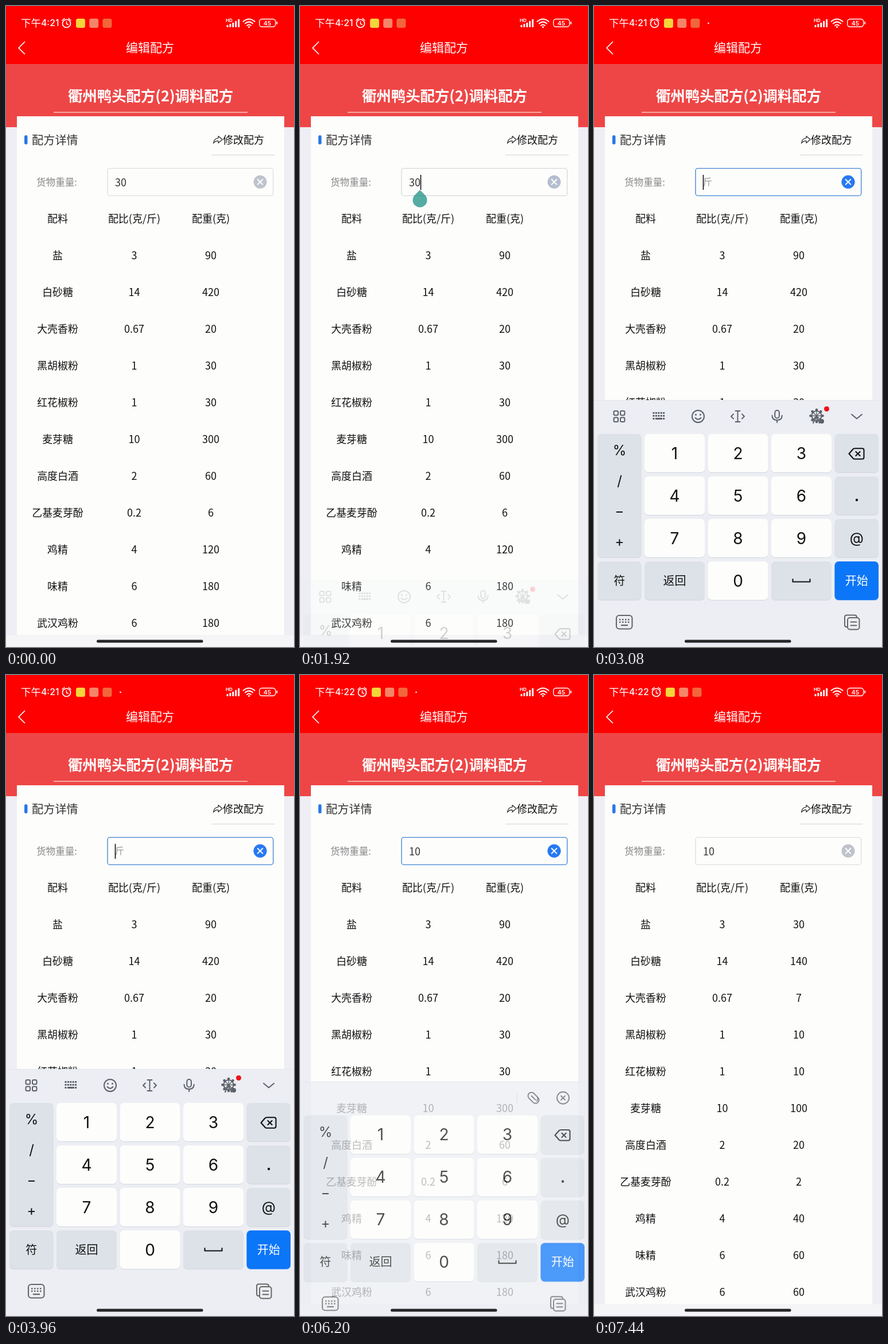
Recreate the animation shown at these times as an HTML page. Size 502 by 1116 pixels, loop 8000 ms.

```html
<!DOCTYPE html>
<html lang="zh-CN">
<head>
<meta charset="utf-8">
<style>
html, body { margin: 0; width: 100%; height: 100%; overflow: hidden; background: #eeeef4; }
svg { display: block; }
text { font-family: "Noto Sans CJK SC", "Noto Sans CJK", sans-serif; }
.mid { text-anchor: middle; }
.ui { font-family: Inter, "Noto Sans CJK SC", sans-serif; }
.line { fill: none; stroke-linecap: round; stroke-linejoin: round; }
</style>
</head>
<body>
<svg id="stage" width="502" height="1116"></svg>
<script>
const LOOP = 8000;
const FOCUS = 1885, DELETE_1 = 2720, DELETE_2 = 2960, TYPE_1 = 4400, TYPE_0 = 5240;
const MINUTE = 5600, BLUR = 6156, RECALC = 6280, DOT_OFF = 7320;
const INK = '#5c6068';

// Markup helpers; text is placed by its visual centre line.
const text = (x, y, s, size, fill = '#111', cls = 'mid', more = '') =>
  `<text x="${x}" y="${y + size * 0.37}" font-size="${size}" fill="${fill}" class="${cls}" ${more}>${s}</text>`;
const rect = (x, y, w, h, fill, r = 0, more = '') =>
  `<rect x="${x}" y="${y}" width="${w}" height="${h}" rx="${r}" fill="${fill}" ${more}/>`;
const line = (d, stroke, width = 2) =>
  `<path class="line" d="${d}" stroke="${stroke}" stroke-width="${width}"/>`;
const disc = (x, y, r, fill, more = '') => `<circle cx="${x}" cy="${y}" r="${r}" fill="${fill}" ${more}/>`;
const ring = (x, y, r, stroke, width = 2) =>
  disc(x, y, r, 'none', `stroke="${stroke}" stroke-width="${width}"`);
const cross = (x, y, r, stroke, width = 2) =>
  line(`M${x - r} ${y - r}l${2 * r} ${2 * r}m0 ${-2 * r}l${-2 * r} ${2 * r}`, stroke, width);
const group = (id, body) => `<g id="${id}">${body}</g>`;

const items = [
  ['盐', 3], ['白砂糖', 14], ['大壳香粉', 0.67], ['黑胡椒粉', 1], ['红花椒粉', 1], ['麦芽糖', 10],
  ['高度白酒', 2], ['乙基麦芽酚', 0.2], ['鸡精', 4], ['味精', 6], ['武汉鸡粉', 6]
];

function statusBar() {
  const bars = [4, 6, 8, 11, 14].map((h, i) => rect(384.5 + i * 4.9, 37 - h, 3, h, '#fff', 1)).join('');
  const alarm = ring(105.5, 30.5, 7, '#fff', 1.7) +
    line('M105.5 27v4l3 1.5M98 25l4-3.5M113 25l-4-3.5', '#fff', 1.5);
  const apps = ['#f4d53a', '#f58468', '#f2663c']
    .map((c, i) => rect(122 + i * 23.2, 22, 16, 16, c, 3.5)).join('');
  const wifi = [[10, 27], [6.7, 30.5], [3.4, 34]]
    .map(([w, y]) => line(`M${423.5 - w} ${y}q${w} ${-w * 0.85} ${2 * w} 0`, '#fff', 2)).join('');
  return text(26, 29.5, '下午', 17.5, '#fff', '') +
    text(61, 29.5, '4:21', 15.8, '#fff', 'ui', 'id="clock" font-weight="500"') +
    group('icons', alarm + apps + group('dot', disc(199.5, 30, 1.3, '#fff'))) +
    text(389, 25, 'HD', 8, '#fff', 'mid ui', 'font-weight="700"') + bars +
    wifi + disc(423.5, 36.5, 1.6, '#fff') +
    rect(441.7, 22.7, 28, 13.6, 'none', 4.5, 'stroke="#fff" stroke-width="1.4"') +
    rect(471.3, 27, 1.8, 5, '#fff', 0.9) +
    text(455.5, 29.8, '45', 10.5, '#fff', 'mid ui', 'font-weight="600"');
}

function inputFrame(stroke, fill) {
  return rect(177, 282.7, 288.7, 47.6, 'none', 4, `stroke="${stroke}" stroke-width="1.3"`) +
    disc(443, 306.3, 11.5, fill) + cross(443, 306.3, 4.3, '#fff', 2);
}

function page() {
  const rows = items.map(([name, ratio], i) => {
    const y = 434 + i * 64;
    return text(90, y, name, 17.9) + text(223.5, y, ratio, 18) +
      text(357, y, '', 18, '#111', 'mid weight');
  }).join('');
  return rect(0, 0, 502, 1116, '#eeeef4') + rect(0, 100, 502, 111, '#ee4646') +
    rect(0, 0, 502, 101, '#fe0000') + statusBar() +
    line('M32.5 62.5l-10.5 10.5 10.5 10.5', '#fff', 1.7) + text(251, 72.3, '编辑配方', 21, '#fff') +
    text(252, 156.5, '衢州鸭头配方(2)调料配方', 25.4, '#fff', 'mid', 'font-weight="700"') +
    rect(83, 184.5, 338, 1.2, '#fbe9e2') +
    rect(19, 192, 466, 903.5, '#fdfdfc') + rect(0, 1095.5, 502, 20.5, '#f5f5f8') +
    rect(32, 225, 5.5, 16, '#2878e6', 2.7) + text(45, 233.5, '配方详情', 20.2, '#333', '') +
    line('M370 226.5l7 6-7 6v-3.5q-5-.5-8.5 4 .8-8.3 8.5-9z', '#222', 1.2) +
    text(378, 233.3, '修改配方', 18, '#111', '') + rect(358, 259, 110.5, 1, '#d6d6c8') +
    text(53, 306.5, '货物重量:', 16.6, '#888', '') +
    inputFrame('#dedfdc', '#bfc3cd') + group('focused', inputFrame('#4488d8', '#2679f3')) +
    text(190, 306.5, '斤', 16, '#999', '', 'id="hint"') +
    text(190, 307.2, '', 18, '#333', '', 'id="value"') +
    rect(0, 294, 1.6, 26, '#111', 0, 'id="caret"') +
    text(90, 370, '配料', 18) + text(223.5, 370, '配比(克/斤)', 18) + text(357, 370, '配重(克)', 18) + rows +
    '<path id="handle" fill="#008577" d="M209 320.3l8.8 8.8a12.5 12.5 0 1 1-17.6 0z"/>';
}

function key(x, y, w, label = '', fill = '#fdfdfc', size = 28, h = 67) {
  const primary = fill === '#0c76f8';
  return rect(x, y + 1, w, h, primary ? '#7fb2f5' : '#d0d6df', 7) + rect(x, y, w, h, fill, 7) +
    text(x + w / 2, y + h / 2 - 0.3, label, size, primary ? '#fff' : '#111', 'mid ui');
}

function toolbar() {
  let s = '';
  for (const x of [34.5, 46]) for (const y of [705, 716.5])
    s += rect(x, y, 7.5, 7.5, 'none', 2.2, `stroke="${INK}" stroke-width="2"`);
  for (let i = 0; i < 10; i++) s += rect(102.5 + i % 5 * 4.4, 707 + (i > 4) * 5, 3, 3, INK, 0.6);
  s += rect(102.5, 717, 3, 3, INK) + rect(107, 717, 12, 3, INK) + rect(120.1, 717, 3, 3, INK);
  s += ring(181.5, 714.5, 10.5, INK) + disc(177.5, 711.5, 1.5, INK) + disc(185.5, 711.5, 1.5, INK) +
    line('M176.5 717q5 5.5 10 0', INK);
  s += line('M246.5 705h8M246.5 724h8M250.5 705v19M243 710.5l-4 4 4 4M258 710.5l4 4-4 4', INK, 1.9);
  s += rect(315.3, 704, 7.6, 13.5, 'none', 3.8, `stroke="${INK}" stroke-width="2"`) +
    line('M310.5 713q0 8 8.6 8t8.6-8M319.1 721v4', INK);
  s += ring(388, 713.5, 8.5, INK, 2);
  for (let a = 0; a < 8; a++) {
    const dx = Math.cos(a * Math.PI / 4), dy = Math.sin(a * Math.PI / 4);
    s += line(`M388 713.5l${dx * 8.5} ${dy * 8.5}`, INK, 1.3) + disc(388 + dx * 10.5, 713.5 + dy * 10.5, 2.3, INK);
  }
  s += line('M388 714l-6 12M388 714l5 12', INK, 2) + disc(397, 723, 4, INK);
  return s + disc(405.5, 701.5, 4.5, '#f01018') + line('M449 711l9 7.5 9-7.5', INK);
}

function suggestions() {
  const link = line('M405 720.5h-3a6 6 0 0 1 0-12h7a6 6 0 0 1 6 6M409 708.5h3a6 6 0 0 1 0 12h-7M402 714.5h10', INK, 1.9);
  return group('words', text(36.5, 714, '号', 25) + text(101, 714, '点', 25)) +
    rect(377.5, 706, 1, 17, '#ccd0da') + `<g transform="rotate(45 407 714.5)">${link}</g>` +
    ring(458.5, 714.5, 10.5, INK, 1.9) + cross(458.5, 714.5, 3.5, INK, 1.9);
}

function keyboard() {
  const grey = '#dde2e8';
  const cols = [88, 198.5, 309], rows = [745, 819, 893];
  let s = rect(0, 686, 502, 440, '#ecEEf3') + rect(0, 686, 502, 1, '#e0e4ea') +
    group('toolbar', toolbar()) + group('suggestions', suggestions());
  s += key(6, 745, 76.5, '', grey, 20, 215);
  ['%', '/', '−', '+'].forEach((c, i) => s += text(44.5, 773 + i * 53, c, 24, '#111', 'mid ui'));
  for (let n = 0; n < 9; n++) s += key(cols[n % 3], rows[Math.floor(n / 3)], 105, n + 1);
  ['', '', '@'].forEach((c, i) => s += key(419.5, rows[i], 76.5, c, grey, 25));
  s += disc(458, 860, 2.2, '#111') +
    line('M444.5 779.5l7-8q1.2-1.3 3-1.3h13q3 0 3 3v12.6q0 3-3 3h-13q-1.8 0-3-1.3z', '#111', 2.1) +
    cross(460, 779.5, 3.6, '#111', 2.1);
  s += key(6, 967, 76.5, '符', grey, 20) + key(88, 967, 105, '返回', grey, 20) + key(198.5, 967, 105, '0') +
    key(309, 967, 105, '', grey) + key(419.5, 967, 76.5, '开始', '#0c76f8', 20) +
    line('M346.5 998v4.5h30v-4.5', '#111', 2.1);
  s += rect(39, 1061, 27.5, 23.5, 'none', 5, 'stroke="#666" stroke-width="2.1"');
  for (let i = 0; i < 8; i++) s += rect(44 + i % 4 * 5, 1067 + (i > 3) * 4.5, 2.5, 2.5, '#666');
  s += rect(47, 1077, 12, 2.3, '#666');
  s += line('M441 1081h-.5q-3.5 0-3.5-3.5v-13.5q0-3.5 3.5-3.5h13.5q4 0 4 4', '#666', 2) +
    rect(442, 1065, 20.5, 20.5, 'none', 4, 'stroke="#666" stroke-width="2"') +
    line('M447.5 1072.5h10M447.5 1078.5h10', '#666', 2);
  return s;
}

document.getElementById('stage').innerHTML =
  page() + group('keyboard', keyboard()) + rect(158, 1103.5, 185.5, 5, '#262629', 2.5);

const $ = id => document.getElementById(id);
const weights = [...document.querySelectorAll('.weight')];
const clamp = v => Math.max(0, Math.min(1, v));
const show = (id, alpha) => $(id).style.opacity = Number(alpha);

function typed(t) {
  if (t < DELETE_1) return '30';
  if (t < DELETE_2) return '3';
  if (t < TYPE_1) return '';
  return t < TYPE_0 ? '1' : '10';
}

function caretOn(t) {
  if (t < FOCUS || t >= BLUR) return false;
  const last = [FOCUS, DELETE_1, DELETE_2, TYPE_1, TYPE_0].filter(e => e <= t).pop();
  return (t - last) % 1000 < 500;
}

function draw(t) {
  const value = typed(t);
  $('value').textContent = value;
  show('hint', value === '');
  $('caret').setAttribute('x', 189.7 + value.length * 10);
  show('caret', caretOn(t));
  show('handle', t < DELETE_1 ? clamp((t - FOCUS) / 54) : 0);
  show('focused', clamp((t - 1910) / 190) * clamp((6400 - t) / 180));

  const late = t >= MINUTE;
  $('clock').textContent = late ? '4:22' : '4:21';
  $('icons').setAttribute('transform', `translate(${late ? 3 : 0} 0)`);
  show('dot', t >= DELETE_1 && t < DOT_OFF);

  const total = t < RECALC ? 30 : 10;
  items.forEach(([, ratio], i) => weights[i].textContent = Math.round(ratio * total));

  const enter = 1 - (1 - clamp((t - 1899) / 221)) ** 3;
  const leave = clamp((t - BLUR) / 200);
  const shift = 430 * (1 - enter + leave * leave);
  $('keyboard').setAttribute('transform', `translate(0 ${shift})`);
  show('keyboard', enter ** 1.3 * clamp(1 - 1.2 * leave));
  show('toolbar', t < TYPE_1);
  show('suggestions', t >= TYPE_1);
  show('words', t < TYPE_0);
}

function tick() {
  draw(performance.now() % LOOP);
  requestAnimationFrame(tick);
}
tick();
</script>
</body>
</html>
```
